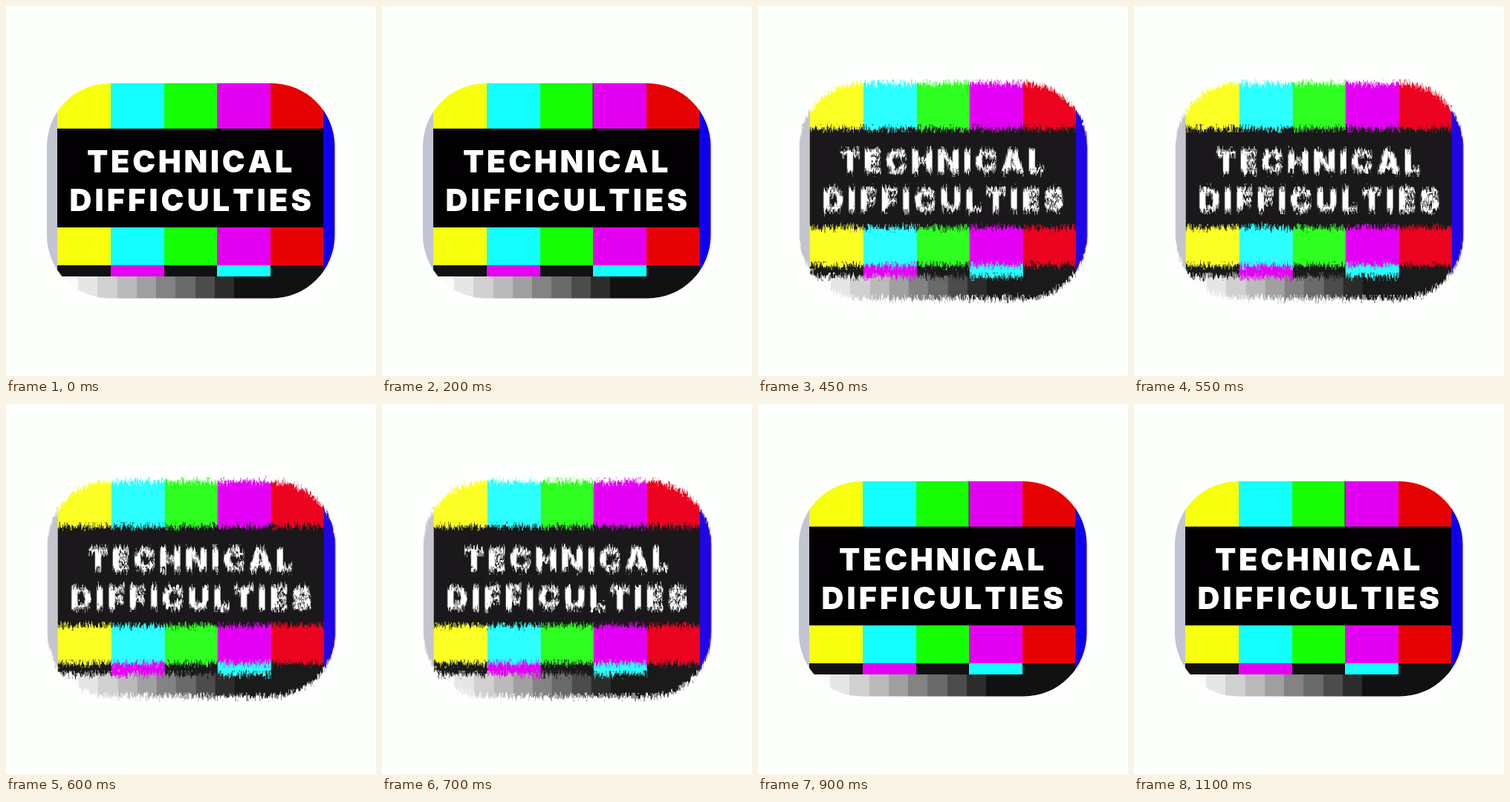
Write an HTML page with a canvas that moves like this. It is 498x498 px and loops after 1.15 s.

```html
<!DOCTYPE html>
<html lang="en">
<head>
<meta charset="utf-8">
<title>Technical difficulties</title>
<style>
  html, body { margin: 0; width: 100%; height: 100%; overflow: hidden; background: #fdfffd; }
  canvas { display: block; width: 498px; height: 498px; }
</style>
</head>
<body>
<canvas id="stage" width="498" height="498"></canvas>
<script>
const SIZE = 498, LOOP = 1150, STEP = 50;
const GLITCH_START = 400, GLITCH_END = 900;
const BACK = '#fdfffd';
const EDGES = [55, 69, 141, 213, 284, 356, 427, 443];
const GREYS = [250, 230, 208, 186, 160, 131, 106, 76, 44, 16];

const CLEAN = {
  bars: ['#c2c4d2', '#f8ff0c', '#14ffff', '#16ff04', '#e300f2', '#e60202', '#0e00ee'],
  box: '#020002', dark: '#111111'
};
const LIFTED = {
  bars: ['#c4c5cc', '#fbff24', '#2cffff', '#2eff20', '#e400f4', '#ec0320', '#2006e6'],
  box: '#1a181a', dark: '#1a1a1a'
};

const stage = document.getElementById('stage').getContext('2d');

function newCanvas() {
  const c = document.createElement('canvas');
  c.width = c.height = SIZE;
  return c.getContext('2d', { willReadFrequently: true });
}

// Tracks the line evenly so that its ink runs from left to right.
function label(g, text, left, right, baseline) {
  g.letterSpacing = '0px';
  const m = g.measureText(text);
  const ink = m.actualBoundingBoxLeft + m.actualBoundingBoxRight;
  g.letterSpacing = (right - left - ink) / (text.length - 1) + 'px';
  g.fillText(text, left + m.actualBoundingBoxLeft, baseline);
}

function drawCard(pal) {
  const g = newCanvas();
  const rect = (color, x0, y0, x1, y1) => {
    g.fillStyle = color;
    g.fillRect(x0, y0, x1 - x0, y1 - y0);
  };
  rect(BACK, 0, 0, SIZE, SIZE);

  g.save();
  g.beginPath();
  g.roundRect(55, 104, 387.5, 289.5, 85);
  g.clip();
  pal.bars.forEach((c, i) => rect(c, EDGES[i], 104, EDGES[i + 1], 364));
  rect(pal.box, 69, 165, 427, 298);

  const { bars, dark } = pal;
  [dark, bars[4], dark, bars[2], dark].forEach((c, i) =>
    rect(c, EDGES[i + 1], 349, EDGES[i + 2], 364));

  GREYS.forEach((v, i) => {
    const x0 = i ? Math.round(97 + (i - 1) * 26.25) : 55;
    const x1 = i < 9 ? Math.round(97 + i * 26.25) : 443;
    rect(i < 9 ? `rgb(${v},${v},${v})` : dark, x0, 364, x1, 394);
  });
  g.restore();

  g.font = '900 41.3px Inter, "Liberation Sans", Arial, sans-serif';
  g.fontKerning = 'none';
  g.fillStyle = '#fff';
  label(g, 'TECHNICAL', 110, 385, 224);
  label(g, 'DIFFICULTIES', 86.5, 410.5, 275.5);
  return g;
}

function soften(src) {
  const g = newCanvas();
  g.fillStyle = BACK;
  g.fillRect(0, 0, SIZE, SIZE);
  g.filter = 'blur(0.7px)';
  g.drawImage(src.canvas, 0.7, 0);
  return g;
}

function random(seed) {
  return () => {
    seed = (seed + 0x6D2B79F5) | 0;
    let t = Math.imul(seed ^ (seed >>> 15), 1 | seed);
    t = (t + Math.imul(t ^ (t >>> 7), 61 | t)) ^ t;
    return ((t ^ (t >>> 14)) >>> 0) / 4294967296;
  };
}

const still = drawCard(CLEAN);
const soft = soften(drawCard(LIFTED)).getImageData(0, 0, SIZE, SIZE).data;

// Smooth noise, fine across and longer downwards.
function noise(rnd, w, h, amp) {
  const CELL_X = 1.3, CELL_Y = 5;
  const cols = Math.ceil(w / CELL_X) + 2, rows = Math.ceil(h / CELL_Y) + 2;
  const grid = Float32Array.from({ length: cols * rows }, () => (rnd() * 2 - 1) * amp);
  return (x, y) => {
    const c = Math.floor(x / CELL_X), u = x / CELL_X - c;
    const r = Math.floor(y / CELL_Y), v = y / CELL_Y - r;
    const k = r * cols + c;
    const top = grid[k] * (1 - u) + grid[k + 1] * u;
    const low = grid[k + cols] * (1 - u) + grid[k + cols + 1] * u;
    return top * (1 - v) + low * v;
  };
}

// Mixes two copies of the card, each with its pixels shifted up or down by noise.
function tear(seed) {
  const X = 50, Y = 94, W = 400, H = 312;
  const rnd = random(seed * 7919 + 17);
  const shifts = [noise(rnd, W, H, 8), noise(rnd, W, H, 8)];
  const out = stage.createImageData(W, H);
  const sum = [0, 0, 0];
  for (let y = 0; y < H; y++) {
    for (let x = 0; x < W; x++) {
      sum.fill(0);
      for (const shift of shifts) {
        const sy = Y + y + shift(x, y);
        const y0 = Math.floor(sy), f = sy - y0;
        const a = (y0 * SIZE + X + x) * 4, b = a + SIZE * 4;
        for (let i = 0; i < 3; i++) sum[i] += soft[a + i] * (1 - f) + soft[b + i] * f;
      }
      const o = (y * W + x) * 4;
      for (let i = 0; i < 3; i++) out.data[o + i] = sum[i] / shifts.length;
      out.data[o + 3] = 255;
    }
  }
  stage.putImageData(out, X, Y);
}

let shown = -1;

function draw(now) {
  const step = Math.floor((now % LOOP) / STEP);
  if (step === shown) return;
  shown = step;
  const t = step * STEP;
  stage.drawImage(still.canvas, 0, 0);
  if (t >= GLITCH_START && t < GLITCH_END) {
    tear(step);
  } else if (t >= 100) {
    stage.fillStyle = '#143a18';
    stage.fillRect(283.5, 104, 1, 61);
  }
}

const begin = performance.now();
function loop() {
  draw(Math.max(0, performance.now() - begin));
  requestAnimationFrame(loop);
}
loop();
</script>
</body>
</html>
```
